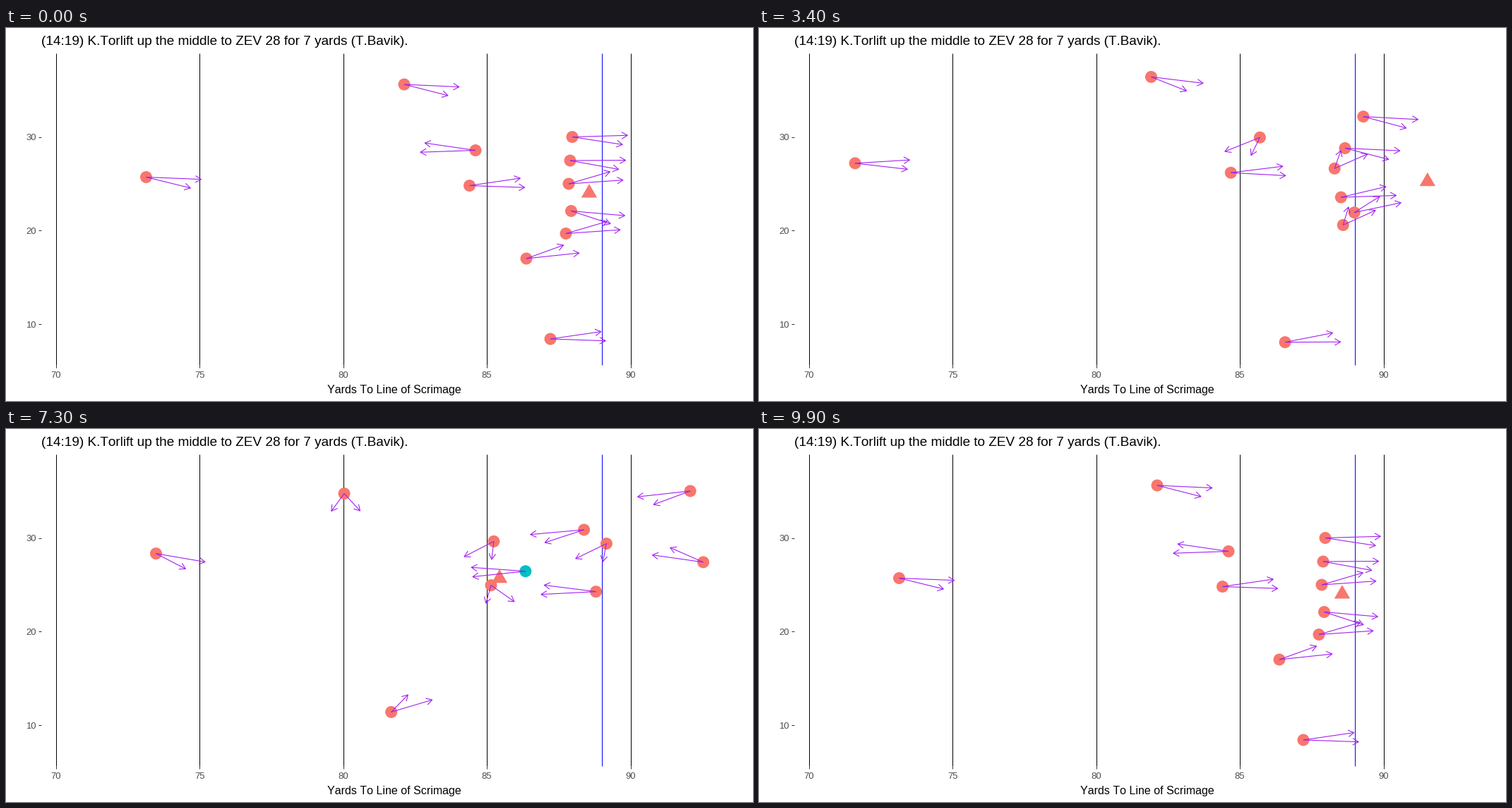
Animation, 1058 px wide and 529 px high, one loop 10000 ms. Source, as a matplotlib script:

```python
import numpy as np
import matplotlib.pyplot as plt
from matplotlib.animation import FuncAnimation
from matplotlib.collections import LineCollection
from matplotlib.patches import Polygon

plt.rcParams.update({"font.family": "Liberation Sans", "text.kerning_factor": 6,
                     "toolbar": "None"})

WIDTH, HEIGHT = 1058, 529
FRAMES, INTERVAL = 100, 100
PT = 0.72                       # points per pixel at 100 dpi
YARD_X, YARD_Y = 40.7, 13.27    # pixels per yard
PANEL_LEFT, PANEL_TOP, PANEL_BOTTOM = 50, 36, 478
RED, TEAL, PURPLE = "#F8766D", "#00BFC4", "#A020F0"
SIGHT, HALF_CONE = 1.93, 15     # yards, degrees
DOT = 17
BREAK, TACKLE = 50, 81          # frames that split a run into phases
CHASE = 0.008                   # share of the gap to the ball closed per frame


def hermite(a, b, slope_a, slope_b, span, u):
    """Cubic from a to b over span frames, u running from 0 to 1."""
    return ((1 + 2 * u) * (1 - u) ** 2 * a + u * u * (3 - 2 * u) * b
            + u * (1 - u) ** 2 * span * slope_a - u * u * (1 - u) * span * slope_b)


def ball_at(t):
    """Snap, drop back, hand-off, then the run to the left."""
    times = np.array([0, 20, 44, 65, 81, 98])
    path = np.array([(826, 234), (830, 234), (1004, 203), (775, 192),
                     (635, 234), (559, 252)], float)
    slopes = np.gradient(path, times, axis=0)
    slopes[1] = 0
    i = min(np.searchsorted(times, t, "right"), len(times) - 1) - 1
    span = times[i + 1] - times[i]
    return hermite(path[i], path[i + 1], slopes[i], slopes[i + 1], span,
                   (t - times[i]) / span)


class Player:
    """Accelerates out of the stance, turns at BREAK, then chases the ball.

    A pose is x, y in pixels and the facing in degrees."""

    def __init__(self, stance, turn, pursuit, power=2):
        self.stance, self.turn, self.pursuit = np.array([stance, turn, pursuit], float)
        self.power = power

    def pose(self, t):
        run = self.turn - self.stance
        if t <= BREAK:
            return self.stance + run * (t / BREAK) ** self.power
        gap = np.append(ball_at(TACKLE) - self.pursuit[:2], 0)
        if t <= TACKLE:
            span = TACKLE - BREAK
            return hermite(self.turn, self.pursuit, self.power * run / BREAK,
                           CHASE * gap, span, (t - BREAK) / span)
        return self.pursuit + gap * (1 - np.exp(-CHASE * (t - TACKLE)))


players = [
    # secondary
    Player((198.5, 211.5, -22), (95.5, 179, 7), (256.5, 180, -54), power=1.3),
    Player((564, 80, -23), (545.5, 57, -50), (474, 105.5, -94)),
    Player((771, 441, 9), (715, 451, 24), (521, 384.5, 63)),
    # linebackers
    Player((665, 173.5, 171), (761, 134, 333), (668.5, 170, 225)),
    Player((656.5, 223.5, 9), (682, 184, 2), (684, 232, -96)),
    Player((737, 327, 33), (886, 248.5, 93), (811, 231, 187), power=1.3),
    # line
    Player((802, 154.5, -10), (918.5, 92, -41), (957, 97.5, -165)),
    Player((799, 188, -14), (866, 150, -34), (834, 170.5, -122)),
    Player((797, 221, 27), (836.5, 174, 117), (805, 144, 222)),
    Player((800.5, 259.5, -30), (852, 217.5, 80), (706, 203, 195)),
    Player((793, 291.5, 27), (901.5, 227, 72), (982, 188, 152)),
]


def shown_time(frame):
    """Recorded moments last two frames; the last frame is the opening again."""
    if frame == FRAMES - 1:
        return 0
    if frame < 4:
        return frame
    return frame - frame % 2 if frame <= 50 else frame - (frame + 1) % 2


def arrow(x, y, degrees):
    a = np.radians(degrees)
    tip = np.array([x + SIGHT * YARD_X * np.cos(a), y - SIGHT * YARD_Y * np.sin(a)])
    back = np.arctan2(y - tip[1], x - tip[0])
    barbs = [tip + 9.5 * np.array([np.cos(back + s), np.sin(back + s)])
             for s in (-np.pi / 6, np.pi / 6)]
    return [[(x, y), tip], [barbs[0], tip, barbs[1]]]


def sees_ball(x, y, facing, ball):
    dx, dy = (ball[0] - x) / YARD_X, (y - ball[1]) / YARD_Y
    off = (np.degrees(np.arctan2(dy, dx)) - facing + 180) % 360 - 180
    return np.hypot(dx, dy) < 2.4 and abs(off) < 62


def yard_x(yards):
    return 70.5 + YARD_X * (yards - 70)


fig = plt.figure(figsize=(WIDTH / 100, HEIGHT / 100), dpi=100, facecolor="white")
ax = fig.add_axes([0, 0, 1, 1])
ax.set(xlim=(0, WIDTH), ylim=(HEIGHT, 0))
ax.axis("off")


def label(x, y, text, size, color="black", ha="center"):
    ax.text(x, y, text, fontsize=size * PT, color=color, ha=ha, va="baseline")


def line(xs, ys, color):
    ax.plot(xs, ys, color=color, lw=PT, solid_capstyle="butt", snap=True, zorder=1)


for yards in range(70, 91, 5):
    x = yard_x(yards)
    line([x, x], [PANEL_TOP, PANEL_BOTTOM], "black")
    line([x, x], [PANEL_BOTTOM, PANEL_BOTTOM + 4], "#333333")
    label(x, 496, str(yards), 13, "#4D4D4D")
line([yard_x(89)] * 2, [PANEL_TOP, PANEL_BOTTOM], "blue")
for yards in (10, 20, 30):
    y = 154.5 + YARD_Y * (30 - yards)
    line([PANEL_LEFT - 4, PANEL_LEFT], [y, y], "#333333")
    label(43, y + 4.8, str(yards), 13, "#4D4D4D", ha="right")
label(PANEL_LEFT, 24, "(14:19) K.Torlift up the middle to ZEV 28 for 7 yards (T.Bavik).",
      19, ha="left")
label(549.5, 518, "Yards To Line of Scrimage", 16)

dots = ax.scatter(np.zeros(len(players)), np.zeros(len(players)), s=(DOT * PT) ** 2,
                  c=RED, linewidths=0, snap=False, zorder=2)
ball_mark = Polygon(np.zeros((3, 2)), fc=RED, lw=0, snap=False, zorder=3)
ax.add_patch(ball_mark)
arrows = LineCollection([], colors=PURPLE, linewidths=1.1 * PT, joinstyle="round",
                        snap=False, zorder=4)
ax.add_collection(arrows, autolim=False)


def update(frame):
    t = shown_time(frame)
    ball = ball_at(t)
    poses = [player.pose(t) for player in players]
    dots.set_offsets([pose[:2] for pose in poses])
    dots.set_facecolor([TEAL if sees_ball(*pose, ball) else RED for pose in poses])
    ball_mark.set_xy(ball + np.array([(0, -12.9), (11.2, 6.5), (-11.2, 6.5)]))
    arrows.set_segments([part for x, y, facing in poses for side in (-1, 1)
                         for part in arrow(x, y, facing + side * HALF_CONE)])
    return dots, ball_mark, arrows


anim = FuncAnimation(fig, update, frames=FRAMES, interval=INTERVAL, repeat=True,
                     repeat_delay=0, blit=False)
plt.show()
```
